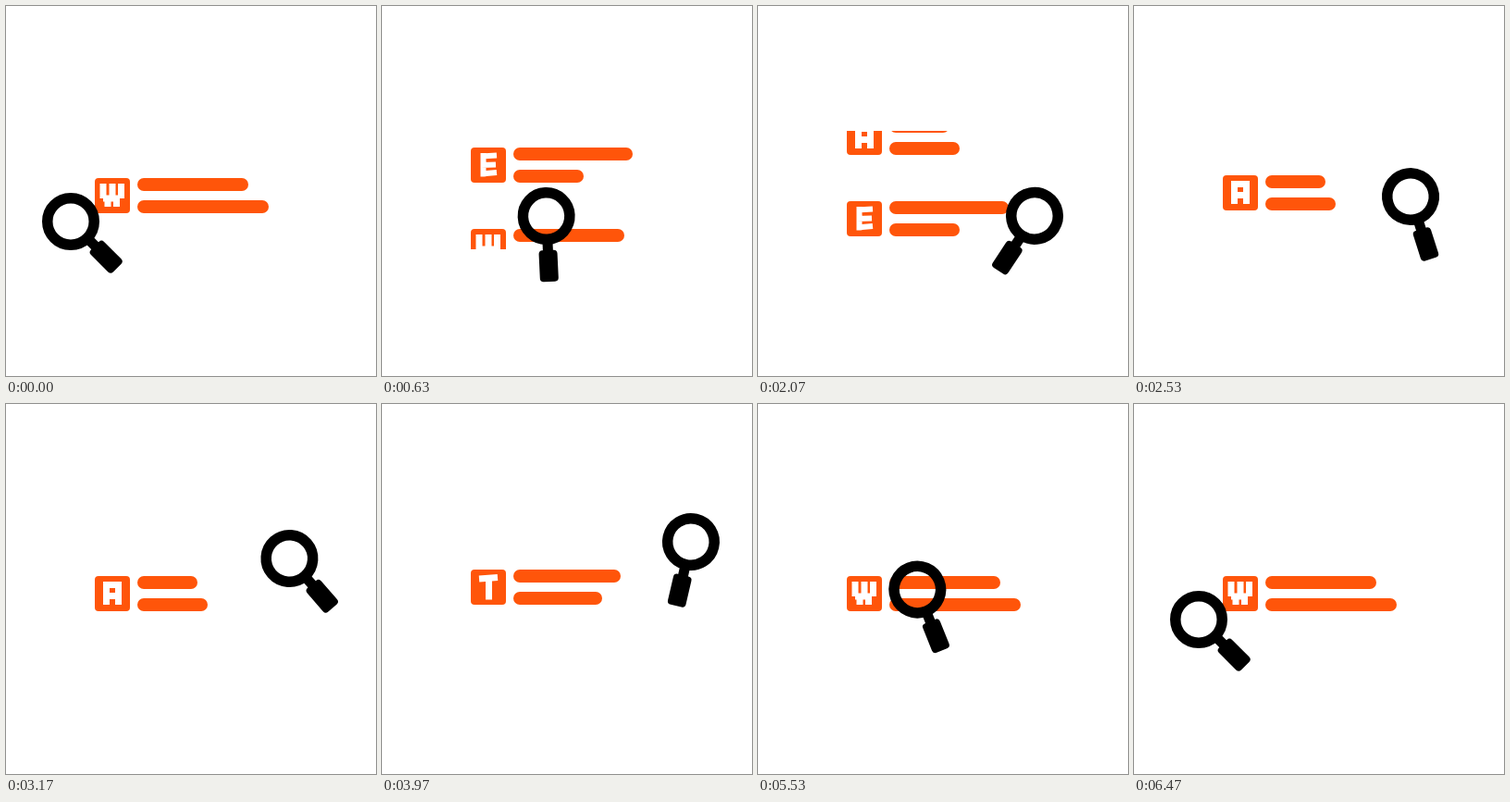
Write an HTML page with a canvas that moves like this. It is 400x400 px and loops after 6510 ms.

```html
<!DOCTYPE html>
<html lang="en">
<head>
<meta charset="utf-8">
<title>Search list</title>
<style>
html, body { margin: 0; width: 100%; height: 100%; overflow: hidden; background: #fff; }
canvas { display: block; width: 400px; height: 400px; }
</style>
</head>
<body>
<canvas id="stage" width="400" height="400"></canvas>
<script>
const ctx = document.getElementById('stage').getContext('2d');
const LOOP = 6510;
const ORANGE = '#ff550a';
const REST = 186;
const STEP = 88;

// Letters as thick strokes inside a 38 px tile
const letters = {
  W: 'M9 6V22M19 6V22M28.5 6V22M9 22H27M14 22V31M23.5 22V31',
  E: 'M13.5 6V31.5M11 9.5L28 8.5M11 19L27 18.5M11 28.5L28 27',
  A: 'M12.5 31V9.5H25.5V31M12 21.5H26',
  T: 'M9 10L29 8.5M19.5 9V32.5'
};
for (const k in letters) letters[k] = new Path2D(letters[k]);

const bars = { W: [120, 142], E: [129, 76], A: [65, 76], T: [116, 96] };

const clamp = v => Math.min(1, Math.max(0, v));
const ease = v => (1 - Math.cos(Math.PI * clamp(v))) / 2;

// Value that eases to each stop in turn: [start, end, new value]
const track = (from, ...stops) => t =>
  stops.reduce((v, [start, end, to]) => v + (to - v) * ease((t - start) / (end - start)), from);

// The T stops slightly above the other rows
const scroll = track(0,
  [110, 1010, STEP],
  [1745, 2645, 2 * STEP],
  [3172, 4072, 3 * STEP - 4],
  [4440, 5340, 4 * STEP - 4]);

const HOME = [4570, 6245];
const lens = {
  x: track(70, [0, 1310, 299], [2763, 4119, 335], [...HOME, 70]),
  y: track(233, [0, 1310, 231], [1780, 3795, 149], [...HOME, 233]),
  angle: track(45, [0, 1310, -45], [1800, 2930, 42], [3080, 4090, -15], [...HOME, 45])
};

function box(x, y, w, h, r) {
  ctx.beginPath();
  ctx.roundRect(x, y, w, h, r);
  ctx.fill();
}

function drawItem(letter, y) {
  ctx.save();
  ctx.translate(96, y);
  ctx.fillStyle = ORANGE;
  box(0, 0, 38, 38, 4);
  bars[letter].forEach((w, i) => box(46, i * 24, w, 14, 7));
  ctx.strokeStyle = '#fff';
  ctx.lineWidth = letter === 'E' ? 6 : 7;
  ctx.stroke(letters[letter]);
  ctx.restore();
}

function drawList(t) {
  ctx.save();
  ctx.beginPath();
  ctx.rect(0, 135, 400, 128);
  ctx.clip();
  [...'WEATW'].forEach((letter, i) => {
    const place = i * STEP - (i === 4 ? 4 : 0);
    const y = Math.round(REST - place + scroll(t));
    if (y > REST - STEP && y < 263) drawItem(letter, y);
  });
  ctx.restore();
}

function drawLens(t) {
  // slight upward arc on the first sweep
  const lift = 5 * Math.sin(Math.PI * ease(t / 1310));
  ctx.save();
  ctx.translate(lens.x(t), lens.y(t) - lift);
  ctx.rotate(-lens.angle(t) * Math.PI / 180);
  ctx.fillStyle = ctx.strokeStyle = '#000';
  ctx.lineWidth = 11.5;
  ctx.beginPath();
  ctx.arc(0, 0, 25.25, 0, Math.PI * 2);
  ctx.stroke();
  ctx.fillRect(-5.5, 28, 11, 12);
  box(-10, 37, 20, 34, 4);
  ctx.restore();
}

function draw(now) {
  const t = now % LOOP;
  ctx.fillStyle = '#fff';
  ctx.fillRect(0, 0, 400, 400);
  drawList(t);
  drawLens(t);
}

let begin;
function tick(now) {
  begin ??= now;
  draw(now - begin);
  requestAnimationFrame(tick);
}
draw(0);
requestAnimationFrame(tick);
</script>
</body>
</html>
```
